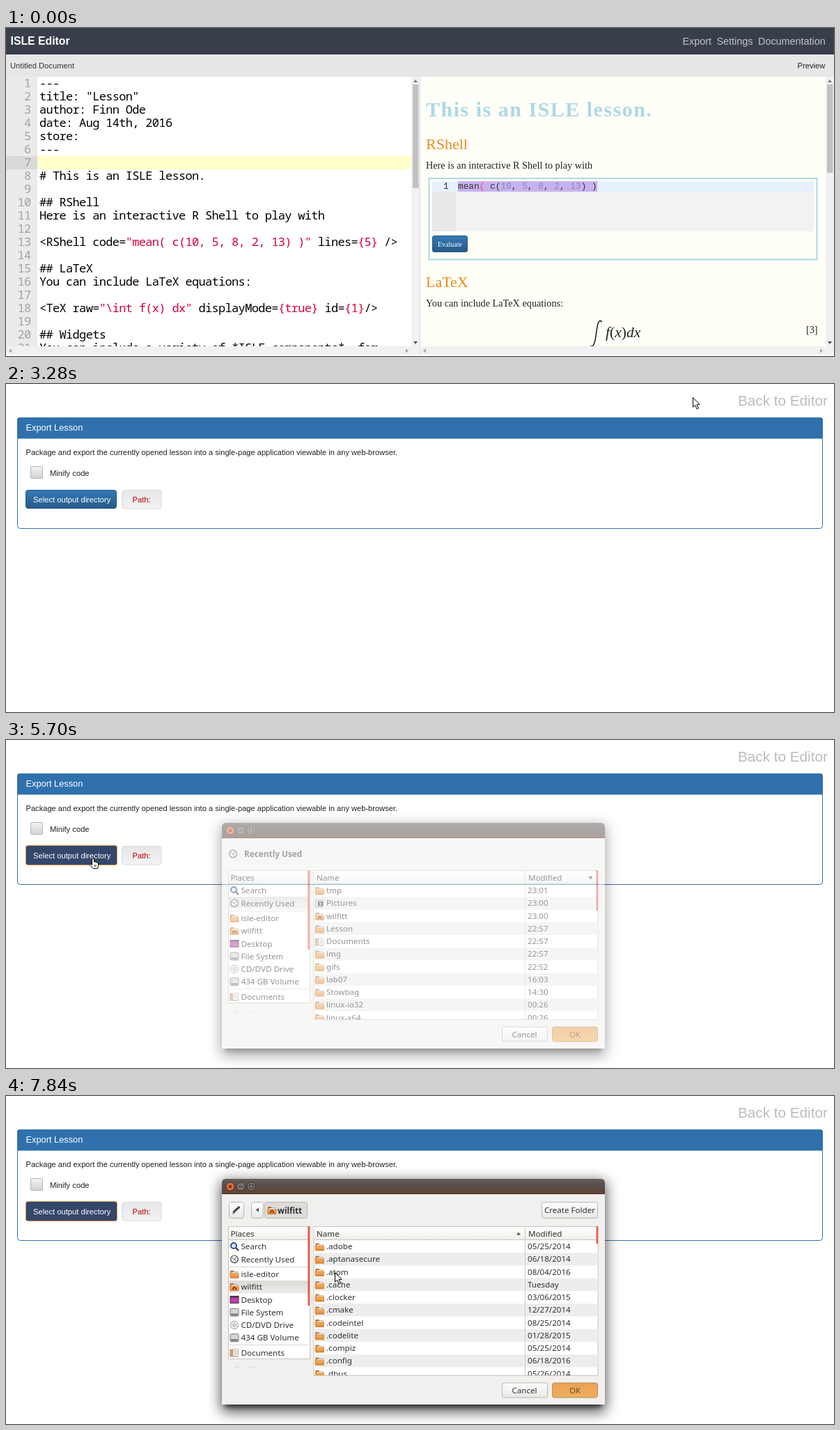
Animation of 1189x471 px, one loop 8000 ms. Source, as an HTML page:

```html
<!DOCTYPE html>
<html lang="en">
<head>
<meta charset="utf-8">
<title>Lesson export</title>
<style>
html, body { margin: 0; width: 100%; height: 100%; overflow: hidden; background: #fff; }
svg { display: block; width: 100%; height: 100%; }
text { white-space: pre; font-family: "Liberation Sans", Arial, sans-serif; }
.serif { font-family: "Liberation Serif", Times, serif; }
.mono { font-family: "Liberation Mono", monospace; }
.code { font-family: "Noto Sans Mono", monospace; letter-spacing: -.68px; }
.gtk { font-family: "Noto Sans", sans-serif; }
</style>
</head>
<body>
<svg id="stage" viewBox="0 0 1189 471"></svg>
<script>
const esc = s => s.replace(/&/g, '&amp;').replace(/</g, '&lt;');
const rich = (s, pattern, color) => esc(s).replace(pattern, m => `<tspan fill="${color}">${m}</tspan>`);
const raw = (x, y, markup, size, fill, cls = '', more = '') =>
  `<text x="${x}" y="${y}" font-size="${size}" fill="${fill}" class="${cls}" ${more}>${markup}</text>`;
const text = (x, y, s, ...rest) => raw(x, y, esc(s), ...rest);
const rect = (x, y, w, h, fill, more = '') =>
  `<rect x="${x}" y="${y}" width="${w}" height="${h}" fill="${fill}" ${more}/>`;
const path = (d, fill, more = '') => `<path d="${d}" fill="${fill}" ${more}/>`;
const line = (d, stroke, width = 1) => path(d, 'none', `stroke="${stroke}" stroke-width="${width}"`);
const circle = (x, y, r, fill, more = '') => `<circle cx="${x}" cy="${y}" r="${r}" fill="${fill}" ${more}/>`;
const group = (id, body, more = '') => `<g id="${id}" ${more}>${body}</g>`;
const gradient = (id, ...colors) => `<linearGradient id="${id}" x2="0" y2="1">` +
  colors.map((c, i) => `<stop offset="${i / (colors.length - 1)}" stop-color="${c}"/>`).join('') + '</linearGradient>';
const middle = 'text-anchor="middle"', bold = 'font-weight="700"';

const defs = '<defs>' +
  gradient('blue', '#337ab7', '#265a88') + gradient('blueHover', '#2d6496', '#264f80') +
  gradient('grey', '#f4f4f4', '#d2d2d2') + gradient('path', '#e6e6e6', '#f3f3f3') +
  gradient('title', '#655c5a', '#574d4b', '#654330') + gradient('head', '#ffffff', '#eeeeec') +
  gradient('button', '#ffffff', '#e8e7e5') + gradient('ok', '#eaa155', '#f0ae60') +
  gradient('folder', '#f8b765', '#e4812b') + gradient('chosen', '#dcdad7', '#eeedeb') +
  '<clipPath id="panes"><rect y="70" width="1189" height="387"/></clipPath>' +
  '<clipPath id="rows"><rect x="442" y="207" width="408" height="194"/></clipPath>' +
  '<filter id="blur" x="-20%" y="-20%" width="140%" height="140%"><feGaussianBlur stdDeviation="10"/></filter>' +
  '<filter id="soft" x="-5%" y="-200%" width="110%" height="500%"><feGaussianBlur stdDeviation="2.5"/></filter></defs>';

// Editor screen
const source = ['---', 'title: "Lesson"', 'author: Finn Ode', 'date: Aug 14th, 2016', 'store:', '---', '',
  '# This is an ISLE lesson.', '', '## RShell', 'Here is an interactive R Shell to play with', '',
  '<RShell code="mean( c(10, 5, 8, 2, 13) )" lines={5} />', '', '## LaTeX', 'You can include LaTeX equations:', '',
  '<TeX raw="\\int f(x) dx" displayMode={true} id={1}/>', '', '## Widgets',
  'You can include a variety of *ISLE components*, for'];

const codeLine = (s, i) => {
  const y = 85 + 19 * i;
  const markup = s[0] === '<' ? rich(s, /"[^"]*"|\{[^}]*\}/g, '#d6003c') : esc(s);
  return text(35.5, y, String(i + 1), 17, '#a2a2a2', 'code', 'text-anchor="end"') + raw(48, y, markup, 17, '#000', 'code');
};
const vbar = (x, bottom) => rect(x, 70, 12, 387, '#f1f1f1') + rect(x + 2, 81, 8.5, bottom - 81, '#c1c1c1') +
  path(`M${x + 3} 78l3-4 3 4z`, '#777') + path(`M${x + 3} 450l3 4 3-4z`, '#505050');
const hbar = (x, w) => rect(x, 457, w, 12, '#f1f1f1') +
  path(`M${x + 8} 460.5l-4 3 4 3z`, '#a3a3a3') + path(`M${x + w - 8} 460.5l4 3-4 3z`, '#a3a3a3');

const shell = rect(607.5, 216, 557, 116.5, '#fffff8', 'stroke="#add8e6" stroke-width="2"') +
  rect(612, 220, 548, 72, '#f2f2f2') + rect(612, 220, 34, 72, '#e8e8e8') + rect(612, 220, 548, 15, '#e6f1fd') +
  rect(649, 220, 200, 15, '#c6b3f0') + rect(680.5, 220.5, 7, 14, 'none', 'stroke="#d9a0dc"') +
  text(628, 231, '1', 12.8, '#333', 'mono') +
  raw(649, 231, rich('mean( c(10, 5, 8, 2, 13) )', /\d+/g, '#8787b4').replace('(', '<tspan fill="#d04a90">(</tspan>'), 12.8, '#333', 'mono') +
  rect(612.5, 298.5, 50, 23, 'url(#blue)', 'rx="2.5" stroke="#245580"') +
  text(637.5, 313.5, 'Evaluate', 10, '#fff', 'serif', middle);

const preview = rect(595, 70, 582, 387, '#fffff8') +
  text(603, 127, 'This is an ISLE lesson.', 30, '#add8e6', 'serif', bold + ' letter-spacing="1.5"') +
  text(603, 174, 'RShell', 22, '#e88c1c', 'serif') + text(603, 372, 'LaTeX', 22, '#e88c1c', 'serif') +
  text(603, 201.5, 'Here is an interactive R Shell to play with', 14.25, '#222', 'serif') +
  text(603, 399.5, 'You can include LaTeX equations:', 14.25, '#222', 'serif') + shell +
  path('M855.5 422.5Q854 418.5 851 422Q849 426 847.5 439T843 456Q841 459 840 456', 'none', 'stroke="#222" stroke-width="1.6"') +
  raw(861, 444, 'f<tspan font-style="normal">(</tspan>x<tspan font-style="normal">)</tspan>dx', 21.5, '#222', 'serif', 'font-style="italic"') +
  text(1149, 438, '[3]', 14.25, '#222', 'serif');

const editor = rect(0, 0, 1189, 471, '#fff') +
  `<g clip-path="url(#panes)">${rect(0, 70, 45, 387, '#ebebeb') + rect(0, 184, 45, 19, '#dadada')}
  ${rect(45, 184, 537, 19, '#ffffcc', 'id="activeLine"') + source.map(codeLine).join('')}
  ${rect(48, 184, 1.6, 19, '#000', 'id="caret"') + preview}</g>` +
  vbar(582, 230) + vbar(1177, 208) + hbar(0, 582) + hbar(595, 582) +
  rect(582, 457, 13, 12, '#f1f1f1') + rect(1177, 457, 12, 12, '#f1f1f1') + rect(594, 70, 1, 399, '#ddd') +
  rect(0, 0, 1189, 38, '#393e4b') + rect(0, 38, 1189, 32, '#e7e7e7') +
  text(6.5, 24, 'ISLE Editor', 15.8, '#fff', '', bold) +
  text(971.5, 24, 'Export', 14.4, '#c0c3c8') + text(1020.5, 24, 'Settings', 14.4, '#c0c3c8') +
  text(1080, 24, 'Documentation', 14.4, '#c0c3c8') + rect(972, 25.3, 41, 1, '#c0c3c8', 'id="underline"') +
  text(6, 58, 'Untitled Document', 11.2, '#333') + text(1136.5, 58, 'Preview', 11.2, '#222');

// Export screen
const exportPage = rect(0, 0, 1189, 471, '#fff') + text(1051, 31, 'Back to Editor', 20.7, '#bcbcbc') +
  rect(16.5, 48.5, 1156, 159, '#fff', 'rx="4" stroke="#3071ad"') +
  path('M16 78.5V52q0-4 4-4h1149q4 0 4 4v26.500z', '#3071ad') + text(28.5, 67, 'Export Lesson', 12.8, '#fff') +
  text(28.5, 102, 'Package and export the currently opened lesson into a single-page application viewable in any web-browser.', 11.12, '#222') +
  rect(35.5, 118.5, 17, 17, 'url(#grey)', 'rx="1.5" stroke="#b4b4b4"') + text(63, 132, 'Minify code', 11.2, '#222') +
  rect(28.5, 152.5, 130, 26, 'url(#blue)', 'id="select" rx="3" stroke="#245580"') +
  rect(28.5, 151.5, 131, 28, '#34466a', 'id="pressed" rx="3" stroke="#dc9544"') +
  text(39, 169.5, 'Select output directory', 11.2, '#fff') +
  rect(166.5, 152.5, 56.5, 26.5, 'url(#path)', 'rx="3" stroke="#dcdcdc"') + text(181.5, 169.5, 'Path:', 11.2, '#b00000');

// File dialog
const ink = '#303030';
const label = (x, y, s, fill = ink, more = '') => text(x, y, s, 11.6, fill, 'gtk', more);
const folder = path('M-6-5h4.500l1 1.500H5V4H-6z', '#b8682c') + rect(-4.5, -3, 9, 5, '#f1ece4') +
  path('M-6.500-1H6V5.500H-6z', 'url(#folder)', 'stroke="#c46f24" stroke-width=".7"');
const clock = circle(0, 0, 5.3, '#f4f4f2', 'stroke="#484848" stroke-width="1.2"') + line('M-3.500-2L0 .5L3-3M0 .5L2 3', '#555');
const icons = {
  folder, clock,
  home: folder + path('M-3 4V1.500L0-.8 3 1.500V4H1V2H-1V4z', '#8d3f16'),
  pictures: rect(-6, -5, 11, 10, '#d9d4cc', 'stroke="#a29b92"') + rect(-2.5, -2.5, 7, 6, '#33304a') + circle(1, .5, 1.5, '#d8d8e8'),
  documents: rect(-6, -4, 10, 9.5, '#d6a06a', 'stroke="#9d8468"') + rect(-2, -5, 7.5, 10, '#f5f4f1', 'stroke="#aaa" stroke-width=".8"') +
    line('M0-2H4M0 0H4M0 2H4', '#aaa', .8),
  search: line('M2 2L6 6', '#333', 2.2) + circle(-1, -1, 4, '#dce8f8', 'stroke="#274f9e" stroke-width="2"'),
  desktop: rect(-6, -5, 12, 10, '#c33cab', 'stroke="#42303e"') + rect(-6, -5, 12, 2, '#42303e'),
  drive: rect(-6, -5.5, 12, 11, '#d5d5d3', 'rx="1.500" stroke="#777"') + rect(-5, 2, 10, 2.5, '#777'),
  disc: circle(0, 0, 5.8, '#e8e8e8', 'stroke="#aaa"') + circle(0, 0, 1.8, '#fff', 'stroke="#999"')
};
const icon = (kind, x, y) => `<g transform="translate(${x} ${y})">${icons[kind]}</g>`;
const gtkButton = (x, y, w, h, fill = 'url(#button)', edge = '#b9b5b0') =>
  rect(x + .5, y + .5, w - 1, h - 1, fill, `rx="3" stroke="${edge}"`);

const user = 'wilfitt';
const places = [['search', 'Search', 216], ['clock', 'Recently Used', 234.3], ['folder', 'isle-editor', 255.8],
  ['home', user, 274], ['desktop', 'Desktop', 292.4], ['drive', 'File System', 310.6], ['disc', 'CD/DVD Drive', 328.9],
  ['drive', '434 GB Volume', 347.2], ['documents', 'Documents', 368.5]];
const recent = [['tmp', '23:01'], ['Pictures', '23:00', 'pictures'], [user, '23:00', 'home'], ['Lesson', '22:57'],
  ['Documents', '22:57', 'documents'], ['img', '22:57'], ['gifs', '22:52'], ['lab07', '16:03'], ['Stowbag', '14:30'],
  ['linux-ia32', '00:26'], ['linux-x64', '00:26']];
const home = [['.adobe', '05/25/2014'], ['.aptanasecure', '06/18/2014'], ['.atom', '08/04/2016'], ['.cache', 'Tuesday'],
  ['.clocker', '03/06/2015'], ['.cmake', '12/27/2014'], ['.codeintel', '08/25/2014'], ['.codelite', '01/28/2015'],
  ['.compiz', '05/25/2014'], ['.config', '06/18/2016'], ['.dbus', '05/26/2014']];

const fileRow = ([name, date, kind = 'folder'], i, fill = ink) => {
  const y = 216 + 18.25 * i;
  return icon(kind, 450.5, y + .5) + label(460, y + 4.2, name, fill) + label(749, y + 4.2, date, fill);
};
const fileList = rows => `<g clip-path="url(#rows)">${rows.map((r, i) => fileRow(r, i)).join('')}</g>`;
const redBar = (x, bottom) => rect(x, 187, 2.6, bottom - 187, '#ea5b50');
const chosenPlace = y => rect(320, y, 114, 18.5, 'url(#chosen)');
const stripes = recent.map((_, i) => i % 2 ? rect(442, 207 + 18.25 * i, 408, 18.25, '#ebeeec') : '').join('');

const frame = rect(309, 123, 552, 330, '#000', 'opacity=".7" filter="url(#blur)"') +
  rect(315, 438, 540, 9, '#000', 'opacity=".45" filter="url(#soft)"') +
  rect(310, 135, 550, 308, '#f1f0ef') + path('M310 141V125q0-6 6-6h538q6 0 6 6v16z', 'url(#title)') +
  rect(310, 140, 550, 1, '#4a3225') +
  circle(322, 130, 6, '#e66a3c', 'stroke="#3f3532"') + line('M320 128l4 4m0-4l-4 4', '#5a2410', 1.3) +
  circle(337, 130, 6, '#7b716c', 'stroke="#3f3532"') + line('M334 130h6', '#3f3532', 1.3) +
  circle(352, 130, 6, '#7b716c', 'stroke="#3f3532"') + rect(349.5, 127.5, 5, 5, 'none', 'stroke="#3f3532"') +
  rect(319.5, 187.5, 117, 190, '#fff', 'stroke="#c9c5b8"') + rect(320, 188, 116, 18, 'url(#head)') +
  rect(442, 187.5, 408, 214, '#fff', 'stroke="#c9c5b8"') + rect(442, 188, 408, 18, 'url(#head)') +
  line('M320 206.5H436M442 206.5H850', '#c9c5b8') +
  `<g clip-path="url(#rows)">${stripes}</g>` + line('M745.5 188V401', '#d0ccc0') +
  label(322.5, 201.5, 'Places') + label(446, 201.5, 'Name') + label(750, 201.5, 'Modified') +
  line('M327.500 389.500h8m-4-4v8M349 389.500h9', '#e2e1df', 1.5) +
  [291, 294, 297].map(y => circle(439, y, .7, '#bbb')).join('') +
  gtkButton(712, 411.5, 66, 22) + label(744.5, 426.5, 'Cancel', ink, middle) +
  gtkButton(784, 411.5, 66, 22, 'url(#ok)', '#b88a58') + label(817, 426.5, 'OK', '#6b4a2a', middle);

const recentView = icon('clock', 326, 163.5) + text(342, 168, 'Recently Used', 11.8, '#4a4a4a', 'gtk', bold) + chosenPlace(225) +
  path('M836.500 196h6l-3 4.500z', '#555') + fileList(recent) +
  group('picked', rect(442, 243, 408, 18.5, '#ee5b51') + rect(442, 261, 408, 1, '#b5632a') + fileRow(recent[2], 2, '#fff')) +
  redBar(847.6, 245);
const homeView = gtkButton(320, 152, 22, 24) + line('M326.500 168l2-3 7-6', '#444', 3) + line('M325.500 170l2-2', '#999', 1.5) +
  gtkButton(352, 152, 18, 24) + path('M363 160.500v6l-4.500-3z', '#555') +
  gtkButton(371, 152, 62, 24, '#dedcda') + icon('home', 382, 164) + label(390, 168.5, user, ink, bold) +
  gtkButton(769, 152, 81, 24) + label(809.5, 168, 'Create Folder', ink, middle) + chosenPlace(265) +
  path('M733 199.500h6l-3-4z', '#555') + fileList(home) + redBar(847.6, 212);

const dialog = frame + group('recentView', recentView) + group('homeView', homeView) +
  line('M320 245.500H434M320 357.500H434', '#d8d5d0') +
  places.map(([kind, name, y]) => icon(kind, 328, y) + label(337.5, y + 4.2, name)).join('') + redBar(433.4, 301);

const outline = 'stroke="#000" stroke-linejoin="round"';
const pointers = group('arrow', path('M.5.500V14L3.700 11.200L6 16.800L8.300 15.800L6 10.400H10z', '#fff', outline)) +
  group('hand', path('M-1.500 9.500V1Q0-.6 1.500 1V5Q3.200 4.200 3.900 5.600Q5.400 5 6 6.400Q7.700 6 7.700 8V11L6.500 14.500H0L-4.500 9.500Q-4.500 7.500-2.800 8.200z', '#fff', outline) +
    line('M2 9v3M4 9v3', '#000', .8)) +
  group('beam', line('M-3-8Q0-8 0-6V6Q0 8-3 8M3-8Q0-8 0-6M0 6Q0 8 3 8', '#000', 1.2));

stage.innerHTML = defs + group('editor', editor) + group('exportPage', exportPage) + group('dialog', dialog) + group('pointer', pointers);

// Pointer stops: time, x, y
const route = [[1140, 330, 185], [1300, 420, 165], [1600, 760, 80], [1800, 950, 30], [1910, 984, 20], [1950, 984, 19],
  [2090, 982, 13], [2230, 982, 13], [2330, 986, 13], [2470, 986, 15], [2610, 987.5, 18], [3270, 987.5, 18],
  [3280, 986, 19], [3660, 986, 19], [3760, 925, 34], [3980, 649, 98], [4250, 340, 150], [4440, 243, 157],
  [4640, 185, 121], [4760, 150, 128], [4890, 129.5, 152.5], [5100, 123, 170], [5240, 123, 170], [5330, 125, 170],
  [6280, 125, 170], [6320, 133.5, 167], [6500, 230, 185], [6800, 370, 195], [7080, 430, 208], [7120, 437, 212],
  [7170, 472, 259], [7210, 472, 253]];
const caretOn = [[180, 790], [1190, 1790], [2090, 2610], [2750, 3280]];

const el = id => document.getElementById(id);
const show = (id, on) => { el(id).style.display = on ? '' : 'none'; };
const within = (t, a, b) => t >= a && t < b;

function pointerAt(t) {
  const next = route.findIndex(p => p[0] > t);
  if (next < 1) return (next ? route[route.length - 1] : route[0]).slice(1);
  const [a, b] = [route[next - 1], route[next]], k = (t - a[0]) / (b[0] - a[0]);
  return [a[1] + (b[1] - a[1]) * k, a[2] + (b[2] - a[2]) * k];
}

function draw(t) {
  const editing = t < 3280;
  const [x, y] = pointerAt(t);
  const onExport = editing && t >= 1140 && x > 972 && y < 30;
  const onSelect = !editing && x > 28 && x < 160 && y >= 152 && y < 180;
  const inText = editing && x < 582 && y > 70;

  show('editor', editing);
  show('exportPage', !editing);
  show('underline', onExport);
  show('caret', caretOn.some(([a, b]) => within(t, a, b)));
  el('caret').setAttribute('fill', t < 2750 ? '#000' : '#b5b5b0');
  el('activeLine').setAttribute('fill', t < 2750 ? '#ffffcc' : '#f5f5f0');

  el('select').setAttribute('fill', onSelect ? 'url(#blueHover)' : 'url(#blue)');
  show('pressed', t >= 5560);

  show('dialog', t >= 5700);
  el('dialog').style.opacity = t < 5740 ? .5 : 1;
  show('recentView', t < 7790);
  show('homeView', t >= 7790);
  show('picked', t >= 7400);

  show('pointer', t >= 1140);
  show('hand', onExport || onSelect);
  show('beam', inText);
  show('arrow', !onExport && !onSelect && !inText);
  el('pointer').setAttribute('transform', `translate(${x.toFixed(1)} ${y.toFixed(1)})`);
}

const start = performance.now();
function tick() {
  draw((performance.now() - start) % 8000);
  requestAnimationFrame(tick);
}
tick();
</script>
</body>
</html>
```
